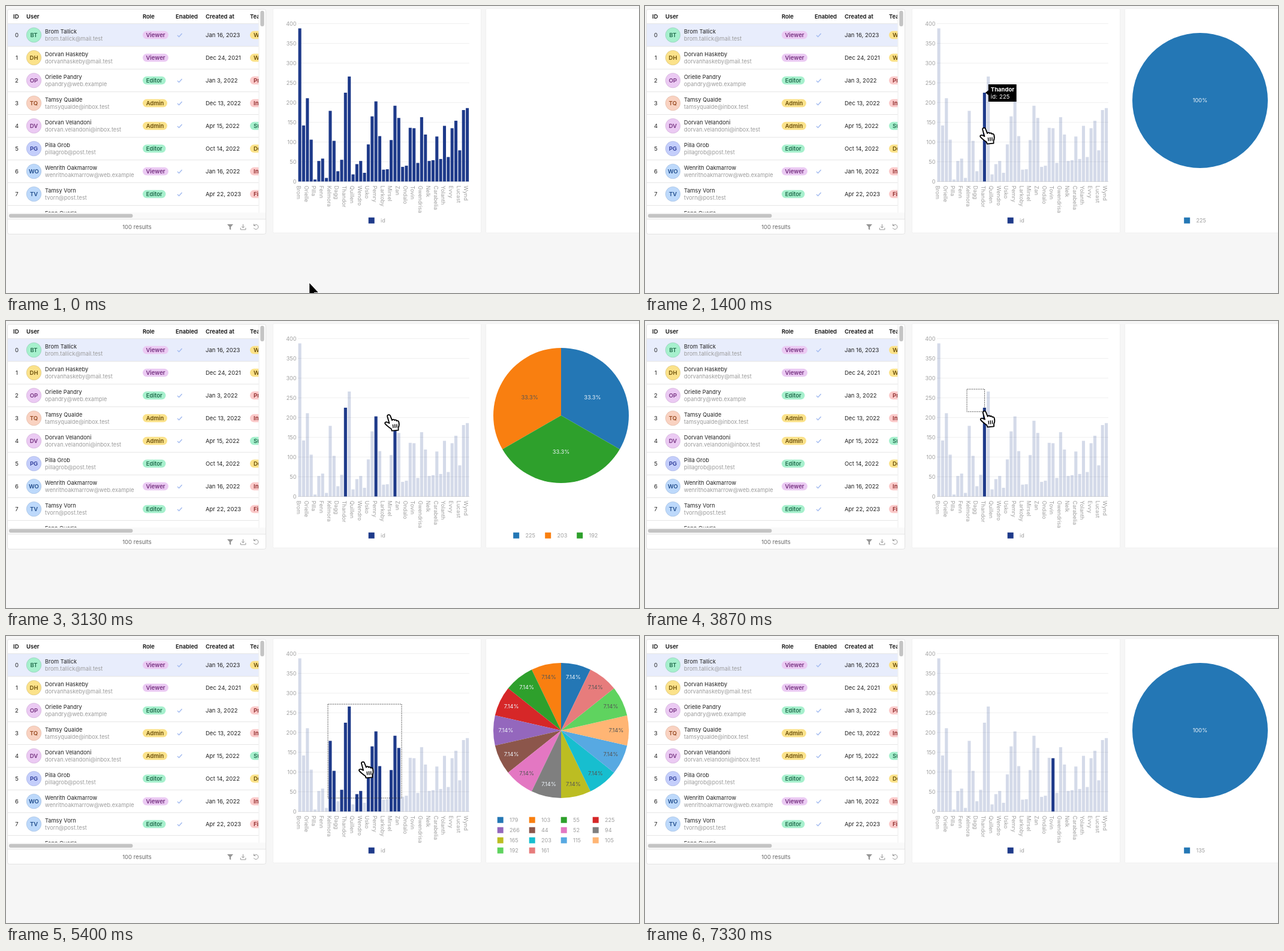
Animation of 1056x480 px, one loop 7.39 s. Source, as an HTML page:

```html
<!DOCTYPE html>
<html lang="en">
<head>
<meta charset="utf-8">
<title>Users dashboard</title>
<style>
  html, body { margin: 0; width: 100%; height: 100%; overflow: hidden; background: #f6f6f6; }
  svg { display: block; width: 1056px; height: 480px; font: 9.25px Inter, sans-serif; }
  .card { fill: #fff; stroke: #f1f1f1; }
  .strong { font-weight: 600; font-size: 9.5px; }
  .body { font-size: 9.5px; }
  .soft { fill: #9b9b9b; }
  .axis { fill: #a0a0a0; font-size: 9.1px; }
  .mid { text-anchor: middle; }
  .line { fill: none; stroke: #969696; stroke-width: 1; }
</style>
</head>
<body>
<svg id="stage" viewBox="0 0 1056 480">
  <defs>
    <clipPath id="tableClip"><rect x="3" y="6" width="418.5" height="339.5"/></clipPath>
  </defs>
  <g id="table"></g>
  <rect class="card" x="445.5" y="4.5" width="347" height="375" rx="2"/>
  <rect class="card" x="800.5" y="4.5" width="270" height="375" rx="2"/>
  <g id="chart"></g>
  <g id="pie"></g>
  <rect id="box" fill="none" stroke="#333" stroke-width="1" stroke-dasharray="1.5 1.5"/>
  <g id="tip" font-size="9.5" fill="#fff">
    <path id="tipShape" fill="#000"/>
    <text id="tipName" x="10.5" y="-2.3" font-weight="700"></text>
    <text id="tipValue" x="10.5" y="10" letter-spacing=".15"></text>
  </g>
  <path id="arrow" d="M0 0V24.5L5.5 19.5L9 27.5L12.7 26L9.3 18.3H17Z" fill="#000" stroke="#fff" stroke-width="1.5"/>
  <g id="hand" stroke="#000" stroke-width="1.7" stroke-linejoin="round">
    <path fill="#fff" d="M-2.6 2C-3 -.8 1 -1.6 2 1L4.8 8C5.5 6 8 6.3 8.6 8C9.4 6.8 11.4 7.2 12 9C13.2 8 15 9 15.3 11C16.2 15 15.8 17 14.5 19.5V23.5L4.5 24.5L3.5 21.5C0 19 -4 16 -6 13.5C-7.2 11.3 -4.5 10 -2.5 11.2L.4 12.6Z"/>
    <path fill="none" stroke-width="1.3" d="M6 14.5L6.6 20M9 14L9.4 20M12 14L12.2 19.5"/>
  </g>
</svg>
<script>
const LOOP = 7390;
const $ = id => document.getElementById(id);
const text = (x, y, str, attrs = '') => `<text x="${x}" y="${y}" ${attrs}>${str}</text>`;
const rect = (x, y, w, h, fill, rx = 0) =>
  `<rect x="${x}" y="${y}" width="${w}" height="${h}" rx="${rx}" fill="${fill}"/>`;
const swatch = (x, y, fill) => rect(x - .3, y - .3, 10, 10, fill);

// ---- table ----
const TONES = {
  green: ['#a6f0cd', '#1f6b4b'], yellow: ['#fbe28a', '#6a4d08'], purple: ['#ebcaf3', '#74307f'],
  peach: ['#f9d2c1', '#97491f'], indigo: ['#c4cefb', '#2c3a98'], blue: ['#bdd9fb', '#1f4b8b'],
  pink: ['#fbcaca', '#8d2a2a']
};
const ROLES = { Viewer: ['purple', 43], Editor: ['green', 38.5], Admin: ['yellow', 41] };
const USERS = [
  ['Brom Tallick', 'brom.tallick@mail.test', 'green', 'Viewer', 1, 'Jan 16, 2023', 'Web', 'yellow'],
  ['Dorvan Haskeby', 'dorvanhaskeby@mail.test', 'yellow', 'Viewer', 0, 'Dec 24, 2021', 'Web', 'yellow'],
  ['Orielle Pandry', 'opandry@web.example', 'purple', 'Editor', 1, 'Jan 3, 2022', 'Product', 'pink'],
  ['Tamsy Qualde', 'tamsyqualde@inbox.test', 'peach', 'Admin', 1, 'Dec 13, 2022', 'Internal', 'pink'],
  ['Dorvan Velandoni', 'dorvan.velandoni@inbox.test', 'purple', 'Admin', 1, 'Apr 15, 2022', 'Support', 'green'],
  ['Pilla Grob', 'pillagrob@post.test', 'indigo', 'Editor', 0, 'Oct 14, 2022', 'Design', 'yellow'],
  ['Wenrith Oakmarrow', 'wenrithoakmarrow@web.example', 'blue', 'Viewer', 1, 'Jan 16, 2022', 'Internal', 'pink'],
  ['Tamsy Vorn', 'tvorn@post.test', 'blue', 'Editor', 1, 'Apr 22, 2023', 'Finance', 'pink']
];

function userRow([name, mail, tone, role, enabled, date, team, teamTone], i) {
  const y = 48.5 + 38 * i;
  const [bg, ink] = TONES[tone];
  const [roleTone, roleWidth] = ROLES[role];
  const initials = name.split(' ').map(w => w[0]).join('');
  return (i ? '' : rect(3, 30, 419, 37.5, '#e8edfc')) +
    rect(3, y + 18.5, 419, 1, '#e6e6e6') +
    text(18, y + 3.4, i, 'class="body mid"') +
    `<circle cx="46.5" cy="${y}" r="12.3" fill="${bg}" stroke="${ink}" stroke-opacity=".22" stroke-width=".8"/>` +
    text(46.5, y + 3.4, initials, `class="strong mid" fill="${ink}"`) +
    text(65, y - 2.7, name) + text(65, y + 9.5, mail, 'class="soft"') +
    rect(228, y - 6.7, roleWidth, 13.4, TONES[roleTone][0], 6.7) +
    text(228 + roleWidth / 2, y + 3.4, role, `class="strong mid" fill="${TONES[roleTone][1]}"`) +
    (enabled ? `<path d="M286 ${y + .5}l2.6 2.5l5 -5.6" fill="none" stroke="#a5bcf0" stroke-width="1.5"/>` : '') +
    text(333, y + 3.4, date, 'class="body"') +
    rect(407, y - 6.7, 50, 13.4, TONES[teamTone][0], 6.7) +
    text(413, y + 3.4, team, `class="strong" fill="${TONES[teamTone][1]}"`);
}

const HEAD = [[12, 'ID'], [34, 'User'], [228, 'Role'], [283, 'Enabled'], [333, 'Created at'], [407, 'Team']];
$('table').innerHTML =
  '<rect class="card" x="2.5" y="5.5" width="431" height="376" rx="3" style="stroke:#e2e2e2"/>' +
  '<g clip-path="url(#tableClip)" fill="#222">' +
  HEAD.map(([x, s]) => text(x, 21, s, 'class="strong" fill="#111"')).join('') +
  rect(3, 29, 419, 1, '#e6e6e6') + USERS.map(userRow).join('') +
  text(65, 349.8, 'Fenn Quorle') + '</g>' +
  rect(421.5, 6, 1, 340, '#ececec') + rect(424.3, 8, 6.4, 26, '#c4c4c4', 3) +
  rect(3, 345.5, 430, 10.5, '#f9f9f9') + rect(5, 347.7, 206.5, 6.2, '#c4c4c4', 3) +
  rect(3, 356, 430, 1, '#e6e6e6') +
  text(218.5, 372.6, '100 results', 'class="body mid" fill="#666"') +
  '<path d="M369 365h10l-3.8 4.6v5l-2.4 -1.4v-3.6z" fill="#969696"/>' +
  '<path class="line" d="M395.5 365v6m-2.5 -2.4l2.5 2.5l2.5 -2.5M391.3 371v3h8.6v-3"/>' +
  '<path class="line" d="M413.6 367.2a4 4 0 1 1 -.3 4M413.5 364.5v3h3"/>';

// ---- bar chart ----
const VALUES = [388, 142, 211, 106, 5, 52, 58, 9, 179, 103, 26, 55, 225, 266, 18, 44, 52, 22, 94, 165, 203, 115,
  30, 31, 105, 192, 161, 37, 40, 136, 135, 47, 163, 119, 52, 54, 114, 57, 141, 62, 135, 154, 79, 181, 186];
const LABELS = ('Brom Orielle Pilla Fenn Kelmora Dagg Thandor Quillen Wendro Usko Pemry Larkoby Mirsel Zan ' +
  'Ondalo Tovin Gwendrisa Nelk Carabelia Yolanth Evvy Lucast Wynd').split(' ');
const HIDDEN_LABELS = { 25: 'Ferrin', 27: 'Hobbin' };
const NAVY = '#1e3a8a';
const STEP = 6.352;
const barX = i => 490.1 + STEP * i;
const valY = v => 293.5 - .66 * v;

let chart = '';
for (let v = 0; v <= 400; v += 50) {
  chart += rect(487, valY(v) - .5, 286, 1, v ? '#f0f0f0' : '#dcdcdc') +
    text(484.5, valY(v) + 3.3, v, 'class="axis" text-anchor="end"');
}
chart += '<g id="bars">' +
  VALUES.map((v, i) => rect(barX(i) - 2.55, valY(v), 5.1, .66 * v, NAVY)).join('') + '</g>';
LABELS.forEach((s, i) => {
  chart += text(0, 0, s, `class="axis" transform="translate(${barX(2 * i) - 5.2} 300.5) rotate(90)"`);
});
$('chart').innerHTML = chart + swatch(605, 354, NAVY) + text(625, 362, 'id', 'class="axis"');
const bars = [...$('bars').children];

// ---- pie ----
const COLORS = ['#2477b5', '#f97f10', '#2ea02c', '#d62728', '#9467bd', '#8c564b', '#e377c2', '#7f7f7f',
  '#bcbd22', '#17becf', '#57a9e2', '#ffb574', '#5fd35f', '#e77c7c'];
const DARK_TEXT = [1, 6, 8, 9, 10, 11, 12, 13];
const PIE = { x: 926, y: 158, r: 113 };
const polar = (r, a) => [PIE.x + r * Math.sin(a), PIE.y - r * Math.cos(a)];

function drawPie(picked) {
  const n = picked.length;
  const step = 2 * Math.PI / n;
  const labelR = n === 1 ? 0 : n === 2 ? 56.5 : n === 3 ? 60.5 : 92;
  const pct = +(100 / n).toFixed(n > 3 ? 2 : 1) + '%';
  const cols = Math.min(n, 4);
  const rows = Math.ceil(n / 4);
  let slices = '', labels = '', legend = '';
  picked.forEach((bar, i) => {
    const end = step * (1 - i);
    const [x, y] = polar(labelR, end - step / 2);
    slices += n === 1
      ? `<circle cx="${PIE.x}" cy="${PIE.y}" r="${PIE.r}" fill="${COLORS[0]}"/>`
      : `<path fill="${COLORS[i]}" d="M${PIE.x} ${PIE.y}L${polar(PIE.r, end - step)}A${PIE.r} ${PIE.r} 0 0 1 ${polar(PIE.r, end)}Z"/>`;
    labels += text(x, y + 3.4, pct, `class="mid" fill="${DARK_TEXT.includes(i) ? '#555' : '#eef4fa'}"`);
    const lx = PIE.x - 26.5 * cols + 53 * (i % 4);
    const ly = 354 - 17 * (rows - 1 - Math.floor(i / 4));
    legend += swatch(lx, ly, COLORS[i]) + text(lx + 20, ly + 8, VALUES[bar], 'class="axis"');
  });
  $('pie').innerHTML = slices + labels + legend;
}

// ---- timeline ----
const PATH = [
  [0, 506, 463], [150, 506, 463], [750, 547, 165], [930, 547, 165], [1150, 566, 205], [1450, 566, 205],
  [1750, 615, 192], [2250, 615, 192], [2600, 648, 190], [2900, 648, 190], [3130, 639, 158],
  [3500, 537, 114], [3600, 537, 114], [4450, 660, 271], [4950, 660, 271], [5450, 594, 210],
  [6300, 594, 210], [6700, 681, 232], [LOOP, 681, 232]
];
const CLICKS = [[0, []], [1280, [12]], [1850, [12, 20]], [2720, [12, 20, 25]], [5700, []], [6850, [30]]];
const DRAG = { x: 537, y: 114, from: 3600, to: 4450, pie: 4800, clear: 5700 };
const CURSOR_OFF = 7150;

function cursorAt(t) {
  const k = PATH.findIndex((p, i) => i && t <= p[0]);
  const [t0, x0, y0] = PATH[k - 1], [t1, x1, y1] = PATH[k];
  const u = (t - t0) / (t1 - t0);
  const e = u * u * (3 - 2 * u);
  return [x0 + (x1 - x0) * e, y0 + (y1 - y0) * e];
}

const show = (id, on) => $(id).style.display = on ? '' : 'none';
const place = (id, x, y, scale = 1) =>
  $(id).setAttribute('transform', `translate(${x} ${y}) scale(${scale})`);

function drawTip(bar) {
  place('tip', barX(bar), valY(VALUES[bar]));
  $('tipName').textContent = bar % 2 ? HIDDEN_LABELS[bar] || 'Ellory' : LABELS[bar / 2];
  $('tipValue').textContent = 'id: ' + VALUES[bar];
  const width = Math.max($('tipName').getComputedTextLength(), $('tipValue').getComputedTextLength());
  $('tipShape').setAttribute('d', `M1.5 0L6.5 -4V-14H${14 + width}V15H6.5V4Z`);
}

let pieKey = '';

function render(t) {
  const [x, y] = cursorAt(t);
  const boxed = t > DRAG.from && t < DRAG.clear;
  const dragging = boxed && t < DRAG.to;
  let picked = CLICKS.filter(c => c[0] <= t).pop()[1];

  show('box', boxed);
  if (boxed) {
    const [bx, by] = cursorAt(Math.min(t, DRAG.to));
    $('box').setAttribute('x', DRAG.x);
    $('box').setAttribute('y', DRAG.y);
    $('box').setAttribute('width', bx - DRAG.x);
    $('box').setAttribute('height', by - DRAG.y);
    picked = [...VALUES.keys()].filter(i =>
      barX(i) > DRAG.x && barX(i) < bx && valY(VALUES[i]) > DRAG.y && valY(VALUES[i]) < by);
  }
  const dim = boxed || picked.length;
  bars.forEach((b, i) => b.setAttribute('opacity', dim && !picked.includes(i) ? .19 : 1));

  const slices = boxed && t < DRAG.pie ? [] : picked;
  if (slices.join() !== pieKey) {
    pieKey = slices.join();
    drawPie(slices);
  }

  const visible = t < CURSOR_OFF;
  const inPlot = y < 300;
  show('arrow', visible && !inPlot);
  show('hand', visible && inPlot);
  place('arrow', x - .5, y - 1.5);
  place('hand', x, y - .5, 1.07);

  const bar = Math.round((x - barX(0)) / STEP);
  const hover = visible && inPlot && !dragging && y >= valY(VALUES[bar]) && y < 293;
  show('tip', hover);
  if (hover) drawTip(bar);
}

const start = performance.now();
function tick() {
  render((performance.now() - start) % LOOP);
  requestAnimationFrame(tick);
}
tick();
</script>
</body>
</html>
```
